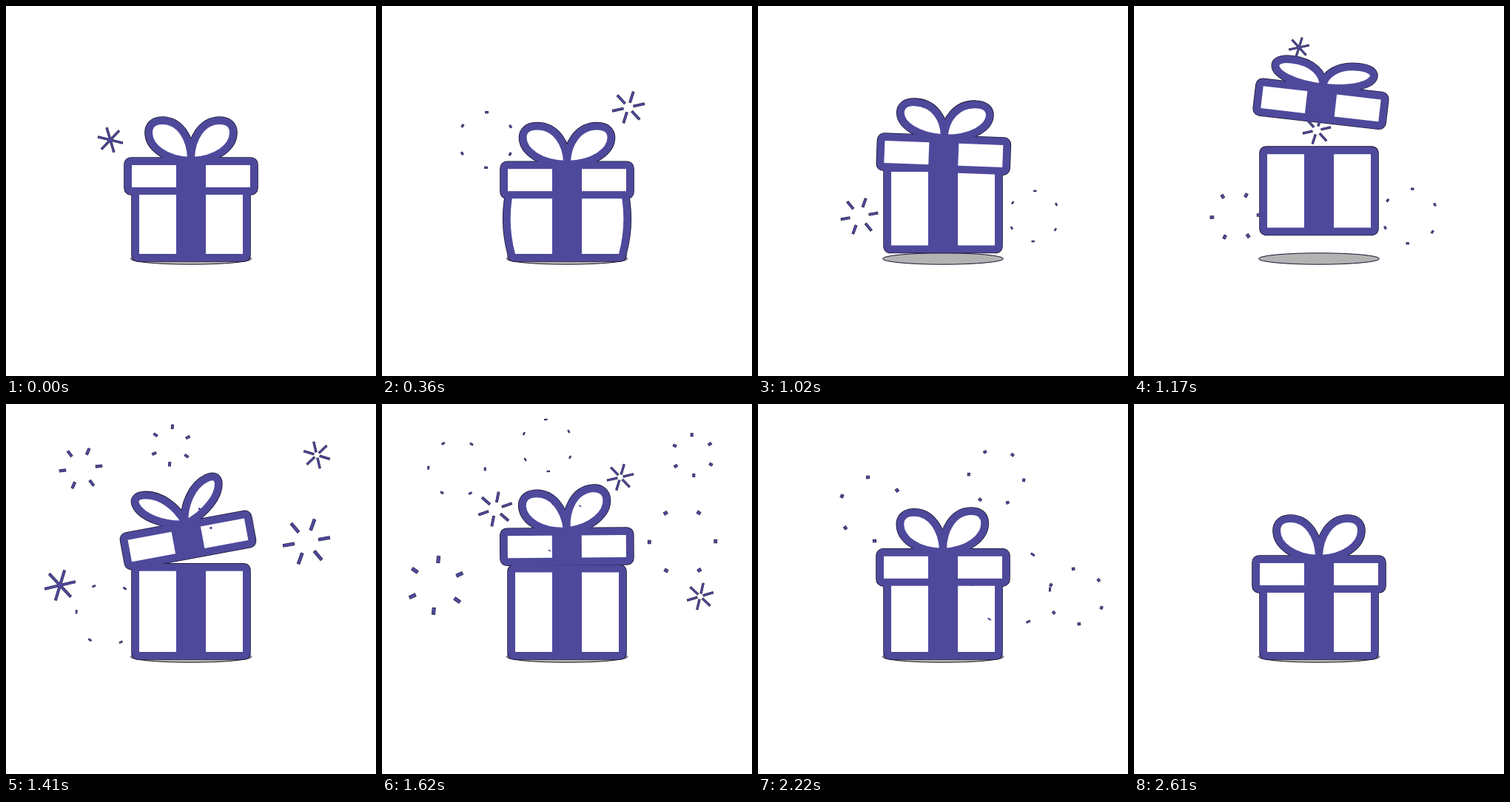
Recreate the animation shown at these times as an HTML page with a canvas. Size 500 px wide and 500 px high, loop 2.64 s.

```html
<!DOCTYPE html>
<html lang="en">
<head>
<meta charset="utf-8">
<title>Gift box</title>
<style>
  html, body { margin: 0; height: 100%; overflow: hidden; background: #fff; }
  canvas { display: block; width: 500px; height: 500px; }
</style>
</head>
<body>
<canvas id="stage" width="500" height="500"></canvas>
<script>
const ctx = document.getElementById('stage').getContext('2d');
const LOOP = 2640, STEP = 30, BURST_LIFE = 880;
const LEAP = 925, LAND = 1415, REST = 2415;
const PURPLE = '#4f499c', DARK = '#17152f', GREY = '#b3b3b3', WHITE = '#fff';
const RAD = Math.PI / 180, RIM = 0.5;
const SMALL = 39, MEDIUM = 45, LARGE = 57;

// x, y, start time, final radius
const bursts = [
  [153, 142, 1350, MEDIUM], [333, 137, 110, MEDIUM],
  [373, 284, 430, SMALL], [137, 284, 725, MEDIUM],
  [223, 56, 1000, SMALL], [247, 168, 920, SMALL],
  [420, 69, 1175, SMALL], [101, 87, 1055, MEDIUM],
  [73, 245, 1230, LARGE], [406, 186, 1115, LARGE],
  [141, 181, -185, MEDIUM], [322, 99, 1385, SMALL],
  [430, 260, 1385, SMALL], [342, 247, 1555, LARGE],
];

const clamp = x => Math.min(1, Math.max(0, x));
const progress = (t, from, to) => clamp((t - from) / (to - from));
const bump = (t, from, to) => Math.sin(Math.PI * progress(t, from, to)) ** 2;
const easeOut = x => 1 - (1 - x) ** 2;

// Squash down, leap, tip over on landing, then sink slowly back to rest.
function poseAt(t) {
  const squash = progress(t, 0, 900) * (1 - progress(t, 900, 1020));
  const leap = bump(t, LEAP, LAND);
  const recoil = bump(t, 1170, 1650);
  const sway = bump(t, 1200, 2400);
  const lift = 47 * progress(t, LEAP, LAND) ** 2 * (1 - progress(t, LAND, REST));
  return {
    lidX: 250 + 2.5 * leap - 4 * recoil,
    lidY: 230 + 13 * squash - 86 * leap - lift,
    lidTurn: 6.5 * leap - 10.5 * recoil,
    bowTurn: -6 * sway - 3 * recoil,
    bowWide: 1 + 0.11 * squash + 0.17 * leap,
    bowTall: 1 - 0.12 * squash - 0.4 * leap,
    pinch: 0.3 * recoil,
    bottom: 345 - 35.5 * leap,
    height: 120 - 13 * squash + 0.2 * lift - 3 * leap,
    bulge: 24 * squash ** 0.7,
  };
}

// The outline pass draws a thin dark rim, the other pass the real colours.
function paint(outline) {
  ctx.fillStyle = PURPLE;
  ctx.strokeStyle = DARK;
  ctx.lineWidth = 1.6;
  outline ? ctx.stroke() : ctx.fill();
}

function drawShadow() {
  ctx.beginPath();
  ctx.ellipse(250, 341.5, 81.5, 7.7, 0, 0, 7);
  ctx.fillStyle = GREY;
  ctx.fill();
  ctx.strokeStyle = DARK;
  ctx.lineWidth = 1;
  ctx.stroke();
}

function drawBody({ bottom, height, bulge }, outline) {
  const top = bottom - height, mid = (top + bottom) / 2;
  ctx.beginPath();
  ctx.moveTo(180, top);
  ctx.lineTo(320, top);
  ctx.quadraticCurveTo(330, top, 330, top + 10);
  ctx.quadraticCurveTo(330 + bulge, mid, 330, bottom - 10);
  ctx.quadraticCurveTo(330, bottom, 320, bottom);
  ctx.lineTo(180, bottom);
  ctx.quadraticCurveTo(170, bottom, 170, bottom - 10);
  ctx.quadraticCurveTo(170 - bulge, mid, 170, top + 10);
  ctx.quadraticCurveTo(170, top, 180, top);
  ctx.closePath();
  paint(outline);
  if (outline) return;
  ctx.fillStyle = WHITE;
  for (const side of [-1, 1]) {
    const near = 250 + side * 20, far = 250 + side * 70;
    ctx.beginPath();
    ctx.moveTo(near, top + 10);
    ctx.lineTo(far, top + 10);
    ctx.quadraticCurveTo(far + side * bulge, mid, far, bottom - 10);
    ctx.lineTo(near, bottom - 10);
    ctx.fill();
  }
}

function drawBow({ bowTurn, bowWide, bowTall, pinch }, outline) {
  for (const side of [-1, 1]) {
    ctx.save();
    ctx.translate(0, -25);
    ctx.rotate(bowTurn * RAD);
    ctx.scale(side * bowWide, bowTall);
    // Pinching narrows a loop across its slanted axis.
    ctx.rotate(-40 * RAD);
    ctx.scale(1 + pinch / 6, 1 - pinch);
    ctx.rotate(40 * RAD);
    ctx.beginPath();
    ctx.moveTo(0, 0);
    ctx.bezierCurveTo(1, -25, 14, -50, 39, -50);
    ctx.bezierCurveTo(52, -50, 57, -42, 57, -34);
    ctx.bezierCurveTo(57, -15, 35, 3, 0, 4);
    ctx.restore();
    ctx.fillStyle = WHITE;
    if (!outline) ctx.fill();
    ctx.strokeStyle = outline ? DARK : PURPLE;
    ctx.lineWidth = outline ? 11.6 : 10;
    ctx.stroke();
  }
}

function drawLid(pose, outline) {
  ctx.save();
  ctx.translate(pose.lidX, pose.lidY);
  ctx.rotate(pose.lidTurn * RAD);
  drawBow(pose, outline);
  ctx.beginPath();
  ctx.roundRect(-90, -25, 180, 50, 9);
  paint(outline);
  if (!outline) {
    ctx.fillStyle = WHITE;
    ctx.fillRect(-80, -15, 60, 30);
    ctx.fillRect(20, -15, 60, 30);
  }
  ctx.restore();
}

// Six rays fly out while their inner ends catch up with the tips.
function drawBurst([x, y, start, radius], index, t, outline) {
  const age = (t - start) / BURST_LIFE;
  if (age < 0.15 || age >= 1) return;
  const grow = easeOut(age), rim = outline ? RIM : 0;
  const tip = radius * grow + rim;
  const tail = 0.92 * radius * easeOut(progress(age, 0.23, 0.83)) - rim;
  const width = radius * (0.03 + 0.06 * grow) + 2 * rim;
  const spin = index % 4 ? 36 : -36;
  ctx.save();
  ctx.translate(x, y);
  ctx.rotate((index % 2 * 30 + spin * grow) * RAD);
  ctx.fillStyle = outline ? DARK : PURPLE;
  for (let i = 0; i < 6; i++) {
    ctx.fillRect(tail, -width / 2, tip - tail, width);
    ctx.rotate(Math.PI / 3);
  }
  ctx.restore();
}

function draw() {
  const t = Math.floor(performance.now() % LOOP / STEP) * STEP;
  const pose = poseAt(t);
  ctx.fillStyle = WHITE;
  ctx.fillRect(0, 0, 500, 500);
  drawShadow();
  for (const outline of [true, false]) {
    drawBody(pose, outline);
    drawLid(pose, outline);
    bursts.forEach((burst, i) => drawBurst(burst, i, t, outline));
  }
  requestAnimationFrame(draw);
}
draw();
</script>
</body>
</html>
```
